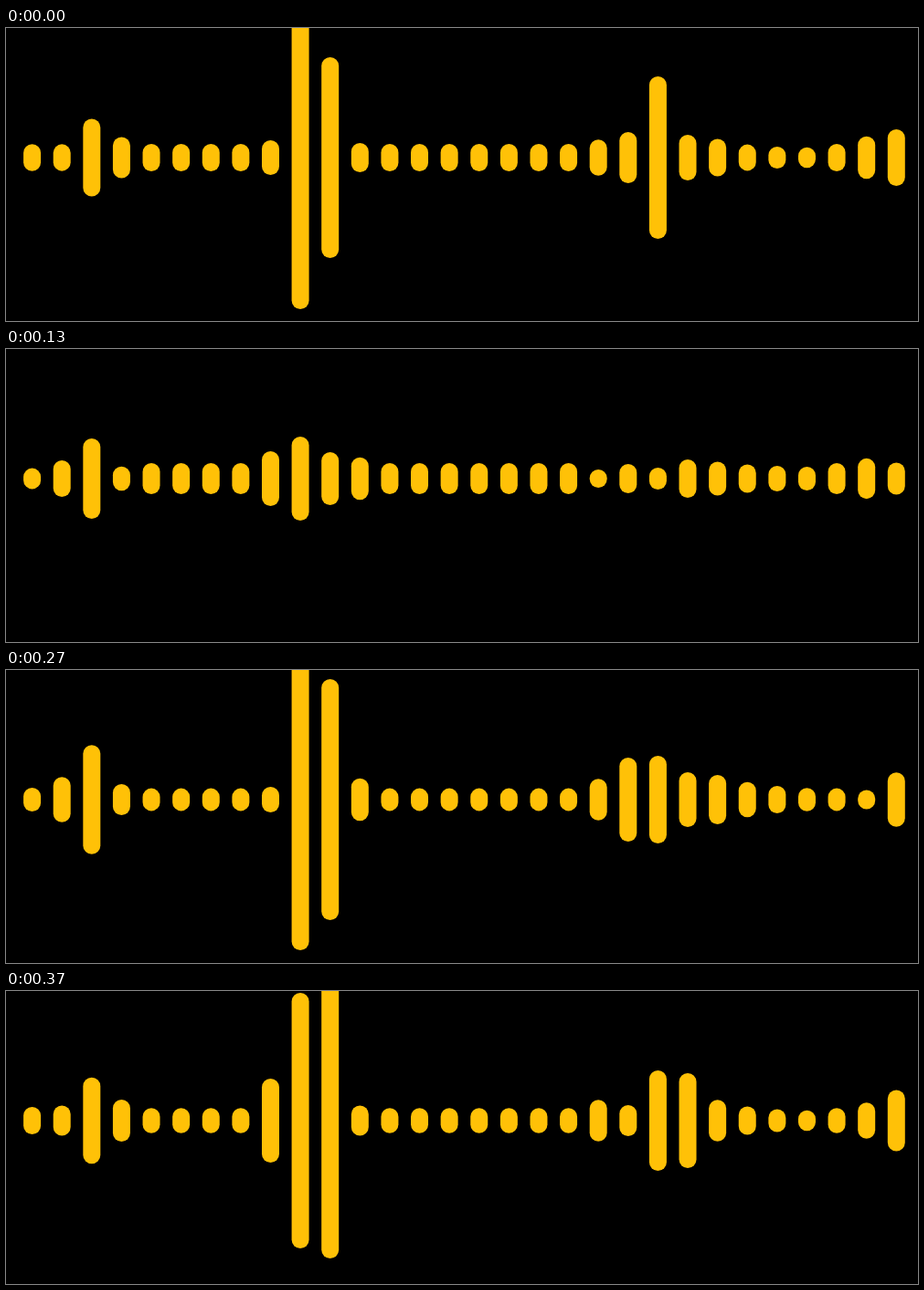
Animation of 998 by 321 pixels, one loop 400 ms. Source, as an HTML page with a canvas:

```html
<!DOCTYPE html>
<html lang="en">
<head>
<meta charset="utf-8">
<title>Sound wave</title>
<style>
  html, body { margin: 0; width: 100%; height: 100%; overflow: hidden; background: #000; }
  canvas { display: block; }
</style>
</head>
<body>
<canvas id="stage" width="998" height="321"></canvas>
<script>
const ctx = document.getElementById('stage').getContext('2d');

const LOOP = 400;
const STEPS = [0, 70, 100, 130, 170, 200, 270, 300, 330, 370];
const BAR = { count: 30, first: 28.6, pitch: 32.61, width: 19, middle: 142 };

// Loud bars jump between key half-heights.
const KEY_TIMES = [0, 70, 130, 200, 270, 330, 370];
const LOUD = {
  8: [19, 24, 30, 35, 14, 50, 46],
  9: [166, 124, 46, 95, 165, 179, 140],
  10: [110, 75, 29, 133, 132, 101, 151],
  20: [28, 26, 16, 37, 46, 29, 17],
  21: [89, 55, 12, 39, 48, 45, 55],
  22: [25, 21, 21, 36, 30, 36, 52]
};

// Swaying bars breathe once per loop around a mean half-height.
const sway = (mean, swing, peak) => ({ mean, swing, peak });
const SWAYING = {
  0: sway(13, 2, 370),
  1: sway(20, 6, 230),
  2: sway(49, 11, 260),
  3: sway(17.5, 5.5, 375),
  11: sway(21, 5, 200),
  19: sway(17.5, 7.5, 320),
  28: sway(18.5, 8, 60),
  29: sway(26, 8.5, 340)
};
const QUIET = sway(14.8, 2.6, 95);

// The right-hand swell fades out over the bars that follow it.
const TAIL = { from: 23, to: 26 };
for (let i = TAIL.from; i <= TAIL.to; i++) {
  const n = i - TAIL.from;
  SWAYING[i] = sway(11 + 11 * 0.5 ** n, 5 * 0.6 ** n, 280 - 30 * n);
}

function interpolate(values, t) {
  const i = Math.min(KEY_TIMES.findLastIndex(key => key <= t), KEY_TIMES.length - 2);
  const k = (t - KEY_TIMES[i]) / (KEY_TIMES[i + 1] - KEY_TIMES[i]);
  return values[i] + (values[i + 1] - values[i]) * k;
}

function halfHeight(index, t) {
  if (LOUD[index]) return interpolate(LOUD[index], t);
  const { mean, swing, peak } = SWAYING[index] || QUIET;
  return mean + swing * Math.cos((t - peak) / LOOP * 2 * Math.PI);
}

function drawBar(index, half) {
  const x = BAR.first + index * BAR.pitch;
  const reach = Math.max(0.01, half - BAR.width / 2);
  ctx.beginPath();
  ctx.moveTo(x, BAR.middle - reach);
  ctx.lineTo(x, BAR.middle + reach);
  ctx.stroke();
}

function draw(t) {
  ctx.fillStyle = '#000';
  ctx.fillRect(0, 0, 998, 321);
  ctx.strokeStyle = '#ffc107';
  ctx.lineWidth = BAR.width;
  ctx.lineCap = 'round';
  for (let i = 0; i < BAR.count; i++) drawBar(i, halfHeight(i, t));
}

function frame() {
  const now = performance.now() % LOOP;
  draw(STEPS.findLast(step => step <= now));
  requestAnimationFrame(frame);
}

frame();
</script>
</body>
</html>
```
